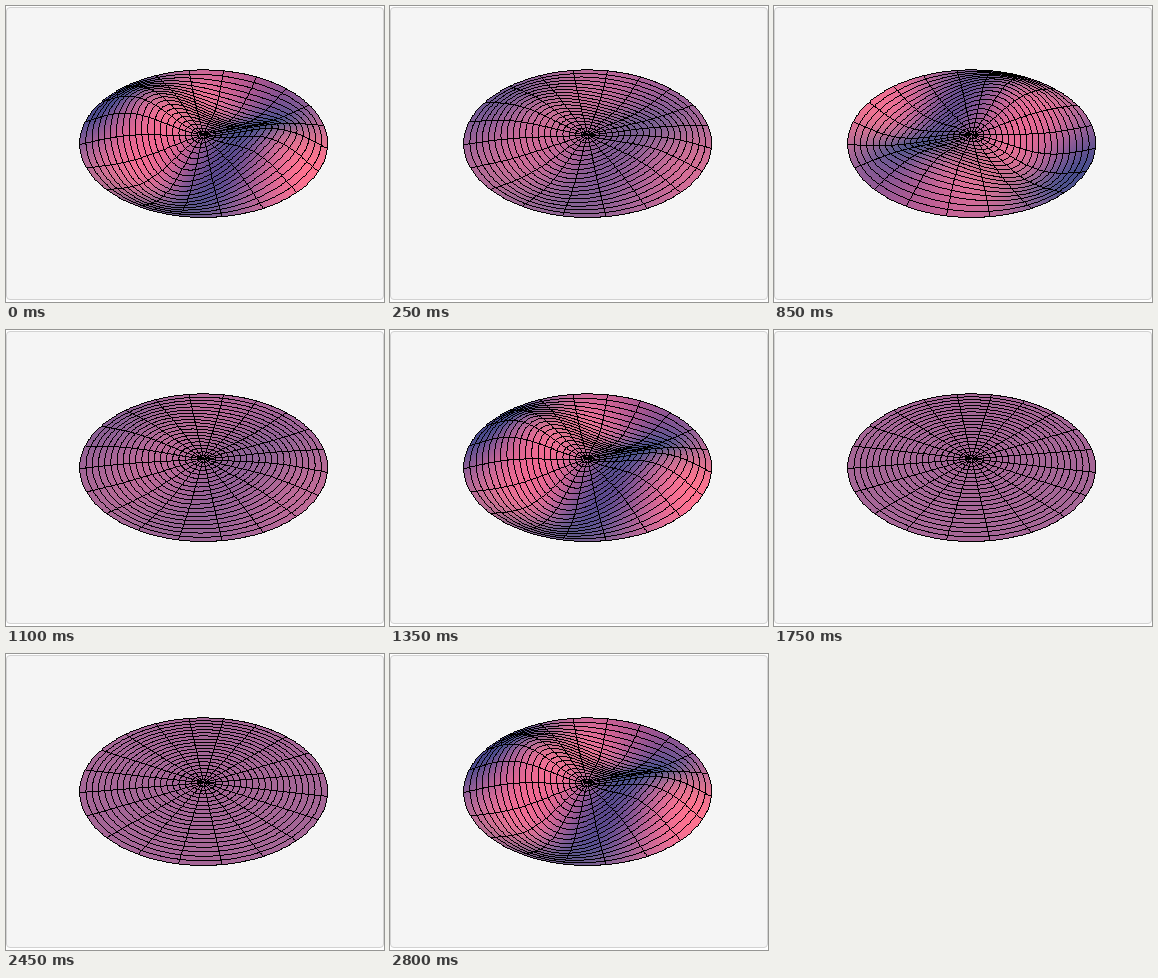
An HTML page with a canvas for the animation above (2.85 s loop, 378 by 296 pixels).

```html
<!DOCTYPE html>
<html lang="en">
<head>
<meta charset="utf-8">
<title>Vibrating membrane, mode (2,1)</title>
<style>
  html, body { margin: 0; width: 100%; height: 100%; overflow: hidden; background: #fff; }
  #panel {
    position: absolute; left: 0; top: 1px; width: 378px; height: 293px;
    box-sizing: border-box; border: 1px solid #d2d2d2; border-radius: 4px; background: #f5f5f5;
  }
  canvas { position: absolute; left: 0; top: 0; image-rendering: pixelated; }
</style>
</head>
<body>
<div id="panel"></div>
<canvas id="stage" width="378" height="296"></canvas>
<script>
const W = 378, H = 296;
const STEP = 50, FRAMES = 57, PERIOD = 28;
const RINGS = 20, SPOKES = 20, SUB = 4, SLICES = SPOKES * SUB;
const RADIUS = 0.5, HEIGHT = 0.175, ZERO = 5.1356;

// Camera
const EYE = [1.3, -2.4, 2];
const DIST = Math.hypot(...EYE);
const SIN = EYE[2] / DIST, COS = Math.hypot(EYE[0], EYE[1]) / DIST;
const TURN = Math.atan2(EYE[0], -EYE[1]);
const SCALE = 833, CX = 197.6, CY = 128.9;

const ctx = document.getElementById('stage').getContext('2d');
const image = ctx.createImageData(W, H);
const pixels = new Uint32Array(image.data.buffer);
const BLACK = 0xff000000;

function bessel(n, x) {
  const N = 40;
  let sum = 0;
  for (let i = 0; i < N; i++) {
    const a = (i + 0.5) * Math.PI / N;
    sum += Math.cos(n * a - x * Math.sin(a));
  }
  return sum / N;
}

// Height and slopes along each ring, for unit amplitude
const rings = Array.from({ length: RINGS + 1 }, (_, i) => {
  const x = ZERO * i / RINGS, r = RADIUS * i / RINGS;
  const z = HEIGHT * bessel(2, x);
  const dr = HEIGHT * (bessel(1, x) - bessel(3, x)) / 2 * ZERO / RADIUS;
  return { r, z, dr, dt: i ? 2 * z / r : 0 };
});

// Red, green and blue lights over a dim ambient colour
function shade(gx, gy) {
  const len = Math.hypot(gx, gy, 1);
  const x = -gx / len;
  const y = (-gy * SIN + COS) / len;
  const z = (gy * COS + SIN) / len;
  return [
    75 + 216 * Math.max(0, (x + z) / Math.SQRT2),
    44 + 72 * Math.max(0, (x + y + z) / Math.sqrt(3)),
    85 + 66 * Math.max(0, (y + z) / Math.SQRT2)
  ];
}

function vertex(ring, slice, amp) {
  const a = slice * 2 * Math.PI / SLICES, p = a - TURN;
  const c = Math.cos(p), s = Math.sin(p);
  const x = ring.r * c, y = ring.r * s;
  const z = amp * ring.z * Math.cos(2 * a);
  const dr = amp * ring.dr * Math.cos(2 * a);
  const dt = -amp * ring.dt * Math.sin(2 * a);
  const depth = DIST + y * COS - z * SIN;
  return {
    x: CX + SCALE * x / depth,
    y: CY - SCALE * (y * SIN + z * COS) / depth,
    depth,
    rgb: shade(dr * c - dt * s, dr * s + dt * c)
  };
}

function triangle(a, b, c) {
  const area = (b.x - a.x) * (c.y - a.y) - (c.x - a.x) * (b.y - a.y);
  if (Math.abs(area) < 1e-6) return;
  const x0 = Math.floor(Math.min(a.x, b.x, c.x)), x1 = Math.ceil(Math.max(a.x, b.x, c.x));
  const y0 = Math.floor(Math.min(a.y, b.y, c.y)), y1 = Math.ceil(Math.max(a.y, b.y, c.y));
  for (let y = y0; y < y1; y++) {
    for (let x = x0; x < x1; x++) {
      const px = x + 0.5, py = y + 0.5;
      const u = ((b.x - px) * (c.y - py) - (c.x - px) * (b.y - py)) / area;
      const v = ((c.x - px) * (a.y - py) - (a.x - px) * (c.y - py)) / area;
      const w = 1 - u - v;
      if (u < 0 || v < 0 || w < 0) continue;
      const mix = i => Math.min(255, Math.round(u * a.rgb[i] + v * b.rgb[i] + w * c.rgb[i]));
      pixels[y * W + x] = BLACK | mix(2) << 16 | mix(1) << 8 | mix(0);
    }
  }
}

function line(a, b) {
  const n = Math.max(1, Math.ceil(Math.max(Math.abs(b.x - a.x), Math.abs(b.y - a.y))));
  for (let i = 0; i <= n; i++) {
    const x = Math.floor(a.x + (b.x - a.x) * i / n);
    const y = Math.floor(a.y + (b.y - a.y) * i / n);
    pixels[y * W + x] = BLACK;
  }
}

function draw(amp) {
  pixels.fill(0);
  const grid = rings.map(ring =>
    Array.from({ length: SLICES }, (_, j) => vertex(ring, j, amp)));
  const cells = [];
  for (let i = 0; i < RINGS; i++) {
    for (let j = 0; j < SLICES; j++) {
      const k = (j + 1) % SLICES;
      const quad = [grid[i][j], grid[i + 1][j], grid[i + 1][k], grid[i][k]];
      const depth = quad.reduce((sum, v) => sum + v.depth, 0);
      cells.push({ quad, depth, first: j % SUB === 0, last: k % SUB === 0 });
    }
  }
  cells.sort((a, b) => b.depth - a.depth);
  for (const { quad: [a, b, c, d], first, last } of cells) {
    triangle(a, b, c);
    triangle(a, c, d);
    line(b, c);
    line(d, a);
    if (first) line(a, b);
    if (last) line(c, d);
  }
  ctx.putImageData(image, 0, 0);
}

const start = performance.now();
let shown = -1;
function tick() {
  const n = Math.floor((performance.now() - start) / STEP) % FRAMES;
  if (n !== shown) {
    shown = n;
    draw(Math.cos(2 * Math.PI * n / PERIOD));
  }
  requestAnimationFrame(tick);
}
tick();
</script>
</body>
</html>
```
